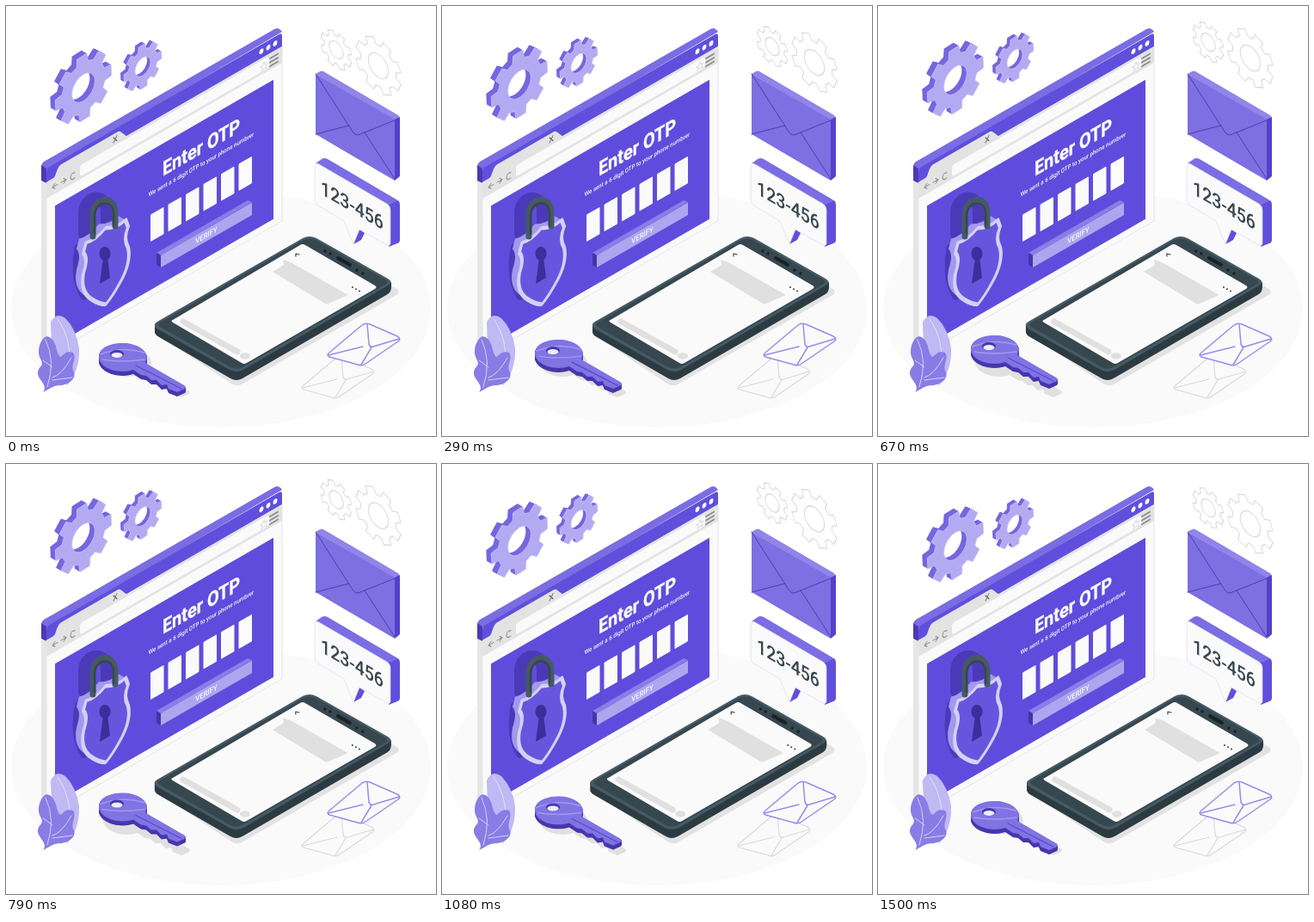
These frames come from a looping animation (500 px wide and 500 px high, 1.54 s). An HTML page:

```html
<!DOCTYPE html>
<html lang="en">
<head>
<meta charset="utf-8">
<title>One-time password</title>
<style>
  html, body { margin: 0; width: 100%; height: 100%; overflow: hidden; background: #fff; }
  svg { display: block; width: 100vw; height: 100vh; }
  text { font-family: Roboto, sans-serif; text-anchor: middle; fill: #fafafa; }
  .line { fill: none; stroke-linecap: round; stroke-linejoin: round; }
</style>
</head>
<body>
<svg viewBox="0 0 500 500">
  <defs>
    <g id="letter">
      <path d="M376 403L414 371Q418 368 423 370L455 384Q460 387 456 390L418 416Q414 419 409 417L376 408Q372 406 376 403Z"/>
      <path d="M420 370L422 393Q423 397 427 396L457 387M375 406L415 396M413 417L425 397"/>
    </g>
  </defs>

  <ellipse cx="250" cy="352" rx="244" ry="138" fill="#fafafa"/>

  <!-- browser window -->
  <path d="M41 186L47 189V408L41 404Z" fill="#e6e6e6"/>
  <path d="M41 186Q41 183 44 181L312 27Q317 24 321 30L47 191Z" fill="#7a6ce3"/>
  <path d="M41 185L47 189V206L41 203Z" fill="#4a39b8"/>
  <g transform="matrix(1 -.577 0 1 47 189)">
    <path d="M0 16V219H274V16" fill="#fafafa" stroke="#e4e4e4"/>
    <path d="M0 16V3Q0 0 3 0H270Q274 0 274 4V16Z" fill="#604fdc"/>
    <path d="M0 16H7Q10 16 11 12L13 8Q14 5 17 5H82Q85 5 87 8L93 16H274V35H0Z" fill="#e3e3e3"/>
    <rect x="39" y="19" width="220" height="13" rx="3" fill="#fafafa"/>
    <rect x="10" y="49" width="254" height="162" fill="#604cdc"/>
    <g fill="#fafafa">
      <ellipse cx="250" cy="8" rx="2.500" ry="3"/>
      <ellipse cx="258" cy="8" rx="2.500" ry="3"/>
      <ellipse cx="266" cy="8" rx="2.500" ry="3"/>
    </g>
    <g class="line" stroke="#8c8c8c" stroke-width="1">
      <path d="M13 26H7M10 23L7 26L10 29M17 26H23M20 23L23 26L20 29M33 24Q29 21 28 26Q28 31 33 30"/>
      <path d="M78 9L82 15M82 9L78 15" stroke="#555"/>
      <path d="M260 22H269M260 26.500H269M260 31H269" stroke-width="2"/>
      <path d="M253 22L254.300 25.500H257L255 27.500L256 31L253 29L250 31L251 27.500L249 25.500H251.700Z" stroke="#dcdcdc"/>
    </g>
    <g id="digits" fill="#fafafa"></g>
  </g>
  <text transform="matrix(.866 -.5 0 1 227 172)" font-size="23" font-weight="700" stroke="#fafafa" stroke-width=".4">Enter OTP</text>
  <text transform="matrix(.866 -.5 0 1 227 186.500)" font-size="7.100" font-weight="500">We sent a 6 digit OTP to your phone numbrer</text>
  <path d="M175 287L281 226L286 228L180 290Z" fill="#8a7de7"/>
  <path d="M175 287L180 290V304L175 301Z" fill="#4535a8"/>
  <path d="M180 290L286 228.500V243L180 304Z" fill="#aea5ef"/>
  <text transform="matrix(.866 -.5 0 1 233 269.500)" font-size="9" font-weight="500">VERIFY</text>

  <!-- padlock -->
  <g transform="translate(-10 -1)" class="line" stroke="#4b3ab8">
    <path d="M101 266V241C101 222 127 217 127 240V255" stroke-width="14"/>
    <path d="M93 281L116 268V332L100 340Q86 318 93 281Z" fill="#4b3ab8" stroke-width="6"/>
  </g>
  <g id="lock"></g>
  <path d="M101 268V244C101 221 127 218 127 242V256" class="line" stroke="#455a64" stroke-width="7"/>
  <path d="M103 265V245C103 226 125 223 125 242V255" class="line" stroke="#37474f" stroke-width="2.500"/>
  <g fill="#3d2e9c">
    <ellipse cx="115" cy="288" rx="6.500" ry="8"/>
    <path d="M113 292H118L121 316L109 323Z"/>
  </g>

  <!-- plant -->
  <path d="M52 368Q58 355 69 363Q82 376 85 398Q86 424 71 441L60 430Q52 396 52 368Z" fill="#c0b9f4"/>
  <path d="M60 364Q79 390 73 434" class="line" stroke="#e4e0fb" stroke-width="1"/>
  <path d="M43 449C50 441 36 434 37 426C38 418 44 420 41 412C36 404 38 396 41 390Q46 381 52 386C60 392 58 406 64 408Q70 400 78 403C83 410 74 418 79 426C82 434 72 440 64 441C54 441 50 446 43 449Z" fill="#897ce5"/>
  <path d="M46 388Q58 413 48 443M43 412L54 420M54 432Q65 429 76 409M54 435L77 432" class="line" stroke="#d6d1f8" stroke-width="1"/>

  <!-- floating gears -->
  <g class="float" id="gears"></g>

  <!-- large envelope -->
  <path d="M360 79L365 76Q367 75 369 76L456 127L458 130L452 133Z" fill="#9085e9"/>
  <path d="M452 132L458 129V198L452 203Z" fill="#5341cc"/>
  <path d="M360 79L452 132V203L360 149Z" fill="#7e6fe2"/>
  <path d="M360 79L403 146Q407 152 412 149L452 133M360 149L399 139M452 201L417 147" class="line" stroke="#4838ad" stroke-width=".9"/>

  <!-- message bubble -->
  <path d="M360 183L367 178Q370 176 374 178L454 225L458 229L447 236Z" fill="#7b6de3"/>
  <path d="M444 232L456 226Q458 228 458 231V272Q458 275 455 276L445 280ZM410 258L417 264L413 272L404 277Z" fill="#604fdc"/>
  <path d="M364 184L443 230Q447 233 447 237V275Q447 280 443 278L411 260L404 277L393 250L363 232Q359 230 359 226V187Q359 181 364 184Z" fill="#fafafa" stroke="#d8d4f0" stroke-width=".6"/>
  <text transform="matrix(.866 .5 0 1 402.500 239.500)" font-size="22.500" font-weight="500" style="fill:#37474f">123-456</text>

  <!-- small envelopes -->
  <g class="line" style="fill:#fafafa">
    <use href="#letter" x="-30" y="38" stroke="#dadada" stroke-width="1.200"/>
    <use href="#letter" stroke="#988deb" stroke-width="1.500"/>
  </g>

  <!-- phone -->
  <path d="M176 382L262 439Q268 443 274 440L454 336Q460 332 453 328L436 319Z" fill="#e2e2e2"/>
  <g id="phone">
    <path d="M173 371V380Q174 383 178 385L261 433Q268 437 275 433L444 335Q448 332 448 327V321L268 420Z" fill="#2c3b42"/>
    <path d="M176 367L345 270Q353 266 361 270L444 317Q451 321 444 325L276 423Q268 427 260 423L177 376Q169 371 176 367Z" fill="#455a64"/>
    <path d="M179 368L346 272Q353 269 360 272L441 318Q446 321 441 324L275 420Q268 423 261 420L179 373Q175 370 179 368Z" fill="#37474f"/>
    <path d="M194 365L342 278Q345 276 348 278L429 325Q432 327 429 329L280 415Q277 417 274 415L194 368Q191 366 194 365Z" fill="#fafafa"/>
    <path d="M310 309L323 301L322 295L331 298L396 335Q398 336 396 337L375 346Q373 347 371 346Z" fill="#e0e0e0"/>
    <path d="M206 367L269 402" class="line" stroke="#e0e0e0" stroke-width="7"/>
    <ellipse cx="278" cy="407" rx="6" ry="3.800" fill="#e0e0e0"/>
    <path d="M337 291V288L341 289" class="line" stroke="#37474f" stroke-width="1.200"/>
    <path d="M386 293L400 301" class="line" stroke="#182126" stroke-width="4"/>
    <path d="M371 285h0M377 288h0M408 307h0M415 311h0" class="line" stroke="#182126" stroke-width="3.500"/>
    <path d="M403 327h0M407 329.300h0M411 331.600h0" class="line" stroke="#37474f" stroke-width="2"/>
  </g>

  <!-- key -->
  <g id="keyShadow"></g>
  <g class="float">
    <g transform="translate(-1 4)">
      <g id="key"></g>
      <path d="M113 407Q134 411 162 407M111 401Q136 391 162 399" class="line" stroke="#a398ee" stroke-width="1.500"/>
      <ellipse cx="130" cy="400.500" rx="8" ry="4.500" fill="#4838ad"/>
      <ellipse cx="130" cy="402" rx="6.500" ry="3" fill="#efedf8"/>
      <path d="M152 414L205 441" class="line" stroke="#5a48cf" stroke-width="1.200"/>
    </g>
  </g>
</svg>
<script>
const byId = id => document.getElementById(id);
const path = (d, attrs) => `<path d="${d}" fill-rule="evenodd" ${attrs}/>`;

// A flat shape thickened by copies that step away from its face.
function solid(d, depth, dx, dy, side, face, matrix = '') {
  let out = '';
  for (let i = depth; i >= 0; i -= 0.5)
    out += `<g transform="translate(${i * dx} ${i * dy}) ${matrix}">${path(d, i ? `fill="${side}"` : face)}</g>`;
  return out;
}

function gear(r, hole, phase) {
  const points = [];
  const profile = [[-15, .77], [-10, 1], [10, 1], [15, .77]];
  for (let tooth = 0; tooth < 8; tooth++)
    for (const [offset, k] of profile) {
      const a = (phase + tooth * 45 + offset) * Math.PI / 180;
      points.push((r * k * Math.cos(a)).toFixed(2) + ' ' + (r * k * Math.sin(a)).toFixed(2));
    }
  return `M${points.join('L')}ZM${-hole} 0a${hole} ${hole} 0 1 0 ${2 * hole} 0a${hole} ${hole} 0 1 0 ${-2 * hole} 0Z`;
}

const solidGear = (x, y, r, hole, depth) => solid(gear(r, hole, -3), depth, -1, -.577,
  '#7666e0', 'fill="#b3aaf2" stroke="#c9c3f7" stroke-width=".8" stroke-linejoin="round"',
  `matrix(.866 -.5 0 1 ${x} ${y})`);
const lineGear = (x, y, r, hole) => `<g transform="matrix(.866 .5 0 1 ${x} ${y})">` +
  path(gear(r, hole, 22), 'class="line" stroke="#dadada" stroke-width="1.2"') + '</g>';

byId('gears').innerHTML = solidGear(90, 95, 38, 15.5, 6) + solidGear(159, 70.5, 25.5, 10.5, 4) +
  lineGear(433, 69.5, 31, 13.5) + lineGear(384, 51, 21, 9.5);

for (let i = 0; i < 6; i++)
  byId('digits').innerHTML += `<rect x="${121 + i * 20.5}" y="123.500" width="15.500" height="31.500" rx="1"/>`;

const shield = 'M0-10Q12-2 23-6L26 4Q20 14 26 28Q30 48 16 64Q8 74 0 79Q-8 74-16 64Q-30 48-26 28Q-20 14-26 4L-23-6Q-12-2 0-10Z';
byId('lock').innerHTML = solid(shield, 8, -1, -.577, '#a399ee',
  'fill="#6855dd" stroke="#d6d0f8" stroke-width="4" stroke-linejoin="round"',
  'matrix(1 -.577 0 1 116 268)');

const keyShape = 'M109 404C109 394 121 388 137 388C153 388 165 396 165 405L163 411L208 437Q211 439 209 441' +
  'L200 445L190 441L188 436L182 437L176 431L170 431L164 426L158 425L149 419C130 425 109 416 109 404Z';
byId('key').innerHTML = solid(keyShape, 5, 0, 1, '#4737ad', 'fill="#8073e3"');
byId('keyShadow').innerHTML = path(keyShape, 'fill="#e0e0e0" transform="translate(4 10)"');

// cubic-bezier(.25, .1, .25, 1)
function ease(x) {
  let lo = 0, hi = 1;
  for (let i = 0; i < 20; i++) {
    const s = (lo + hi) / 2, q = 1 - s;
    if (.75 * q * q * s + .75 * q * s * s + s ** 3 < x) lo = s; else hi = s;
  }
  const s = lo, q = 1 - s;
  return .3 * q * q * s + 3 * q * s * s + s ** 3;
}

const LOOP = 1540, CYCLE = 1500;
const shakeAt = i => i === 0 || i >= 10 ? 0 : i % 2 ? -2 : 2;
const floating = document.querySelectorAll('.float');

function draw(now) {
  const p = Math.min((now % LOOP) / CYCLE, 1);
  const lift = -10 * (1 - Math.abs(1 - 2 * p));
  floating.forEach(el => el.setAttribute('transform', `translate(0 ${lift})`));

  const step = Math.floor(p * 10), from = shakeAt(step);
  const shift = from + (shakeAt(step + 1) - from) * ease(p * 10 - step);
  byId('phone').setAttribute('transform', `translate(${shift} 0)`);
  requestAnimationFrame(() => draw(performance.now()));
}
draw(performance.now());
</script>
</body>
</html>
```
